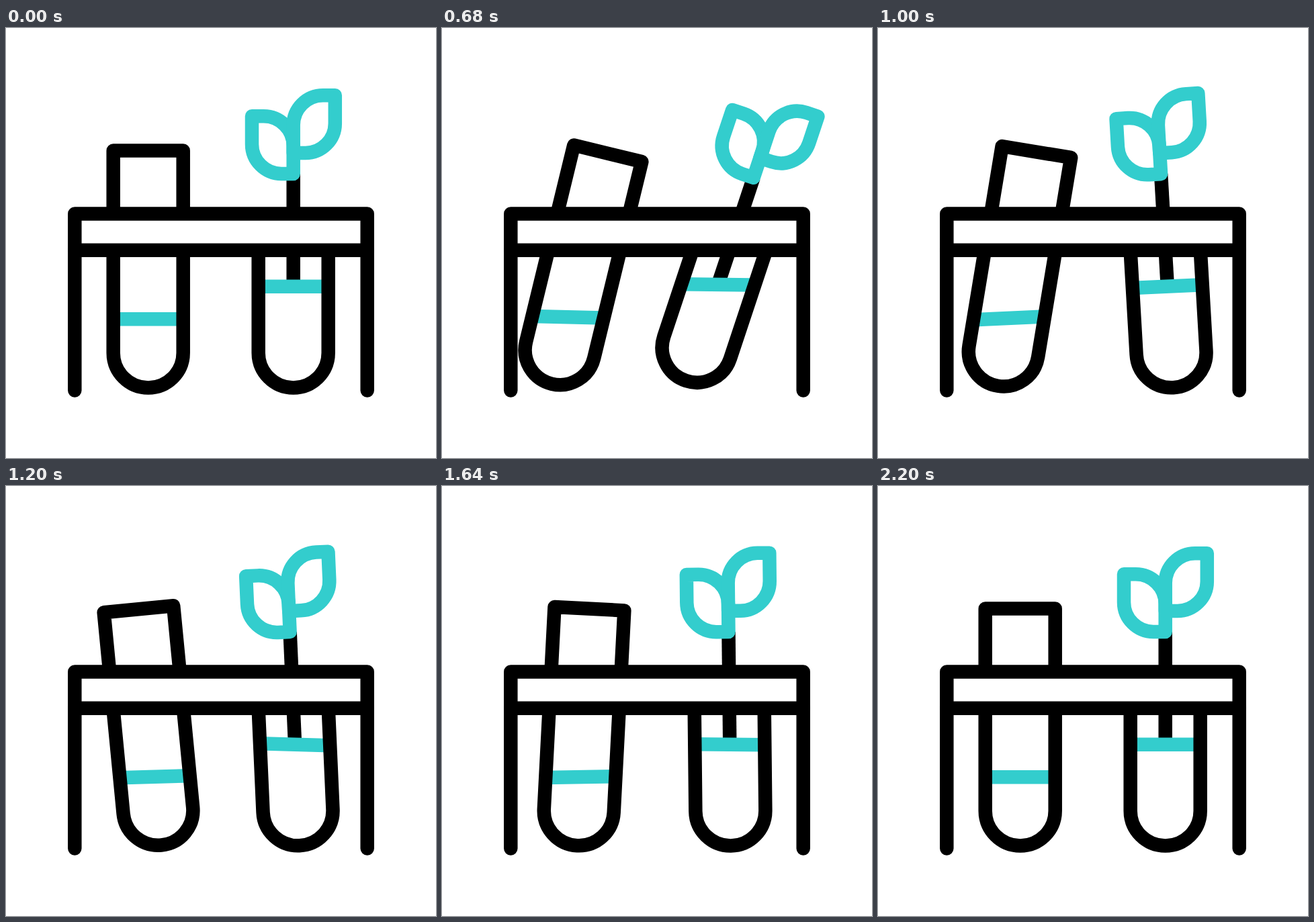
Write an HTML page that moves like this. It is 640 px wide and 640 px high and loops after 2400 ms.

```html
<!DOCTYPE html>
<html lang="en">
<head>
<meta charset="utf-8">
<title>Test tube rack</title>
<style>
html, body { margin: 0; width: 100%; height: 100%; overflow: hidden; background: #fff; }
svg { display: block; width: 100%; height: 100%; fill: none; stroke: #000; stroke-width: 20.5; stroke-linejoin: round; }
.teal { stroke: #33cdcd; }
</style>
</head>
<body>
<svg viewBox="0 0 640 640">
  <g id="leftTube">
    <path id="leftLiquid" class="teal" d="M159.7 433.2h104"/>
    <path d="M159.7 182.5h104v301a52 52 0 0 1-104 0z"/>
  </g>
  <g id="rightTube">
    <path d="M427.7 217V380"/>
    <path id="rightLiquid" class="teal" d="M375.7 384.7h104"/>
    <path d="M375.7 308v175.5a52 52 0 0 0 104 0V308"/>
    <path class="teal" d="M366 131.2h17.5a44.2 44.2 0 0 1 44.2 44.2V217H410a44 44 0 0 1-44-44z"/>
    <path class="teal" d="M489.8 100.3h-17.9a44.2 44.2 0 0 0-44.2 44.2V186h18a44.1 44.1 0 0 0 44.1-44.1z"/>
  </g>
  <path fill="#fff" d="M102.3 276.4h435.4v54.4H102.3z"/>
  <path stroke-linecap="round" d="M102.3 330.8v208.7M537.7 330.8v208.7"/>
</svg>
<script>
const LOOP = 2400, STEP = 40, LAG = 33, PIVOT_Y = 331;

// Each swing is a list of [ms, degrees] turning points.
const tubes = [
  { name: 'left', x: 211.7, level: 433.2,
    swing: [[310, 0], [840, 17.5], [1250, -6.5], [1570, 4.4], [1800, -2], [2160, 0]] },
  { name: 'right', x: 427.7, level: 384.7,
    swing: [[200, 0], [720, 18.7], [1080, -6.5], [1370, 4.1], [1570, -1.4], [1700, 0]] }
];

function angleAt(swing, t) {
  const next = swing.findIndex(([time]) => time > t);
  if (next < 1) return 0;
  const [t0, a0] = swing[next - 1], [t1, a1] = swing[next];
  const u = (t - t0) / (t1 - t0);
  return a0 + (a1 - a0) * u * u * (3 - 2 * u);
}

function rotate(id, angle, x, y) {
  document.getElementById(id).setAttribute('transform', `rotate(${angle} ${x} ${y})`);
}

function draw() {
  const t = Math.floor(performance.now() % LOOP / STEP) * STEP;
  for (const { name, x, level, swing } of tubes) {
    rotate(name + 'Tube', angleAt(swing, t), x, PIVOT_Y);
    // The liquid levels itself slightly late, which makes it slosh.
    rotate(name + 'Liquid', -angleAt(swing, t - LAG), x, level);
  }
  requestAnimationFrame(draw);
}
draw();
</script>
</body>
</html>
```
